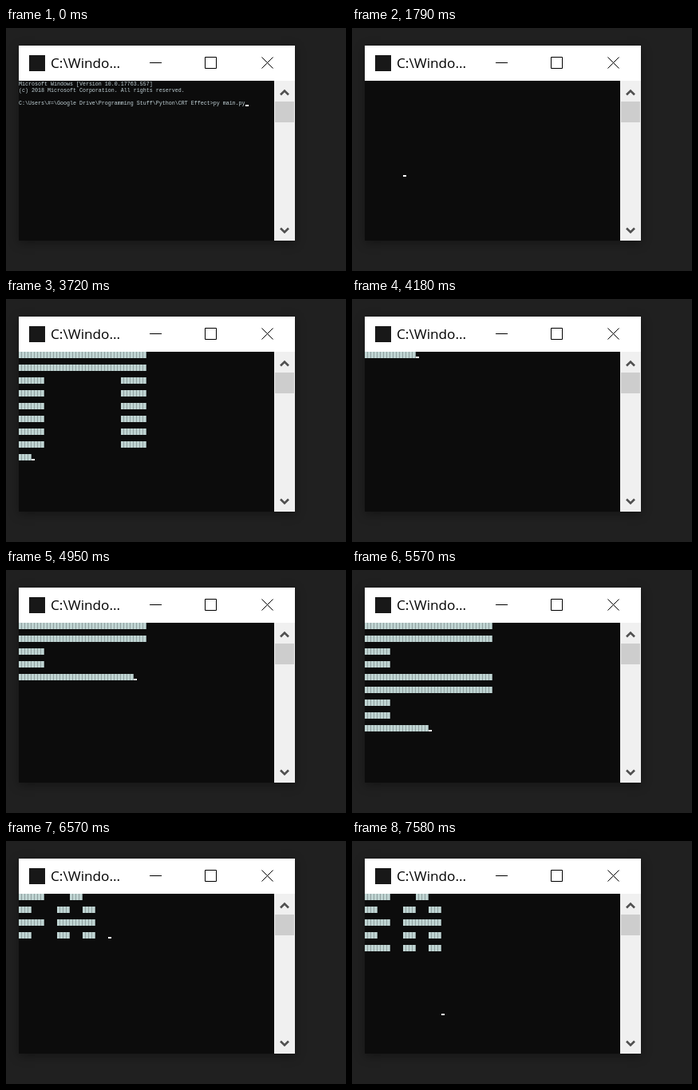
An HTML page with a canvas for the animation above (7.66 s loop, 426 by 304 pixels).

```html
<!DOCTYPE html>
<html lang="en">
<head>
<meta charset="utf-8">
<title>Console</title>
<style>
  html, body { margin: 0; width: 100%; height: 100%; overflow: hidden; background: #202020; }
  #stage { position: relative; width: 426px; height: 304px; overflow: hidden; background: #202020; }
  #window {
    position: absolute; left: 16px; top: 22px; width: 346px; height: 244px;
    background: #fff; box-shadow: 0 3px 12px rgba(0, 0, 0, .38);
  }
  #title {
    position: absolute; left: 40px; top: 10px; line-height: 24px; color: #000;
    font-family: "Open Sans", "Noto Sans", sans-serif; font-size: 17.2px; white-space: pre;
  }
  #icon { position: absolute; left: 13px; top: 12px; width: 20px; height: 20px; background: #181818; }
  #chrome { position: absolute; left: 0; top: 0; }
  #console { position: absolute; left: 0; top: 44px; width: 320px; height: 200px; background: #0c0c0c; }
  #console canvas { position: absolute; left: 0; top: 0; }
  #prompt {
    position: absolute; left: 0; top: 0; margin: 0; color: #c3d3d8; white-space: pre;
    font: 6.667px/8px "Liberation Mono", "DejaVu Sans Mono", monospace;
  }
</style>
</head>
<body>
<div id="stage">
  <div id="window">
    <div id="icon"></div>
    <div id="title">C:\Windo...</div>
    <div id="console">
      <pre id="prompt">Microsoft Windows [Version 10.0.17763.557]
(c) 2018 Microsoft Corporation. All rights reserved.

C:\Users\#=\Google Drive\Programming Stuff\Python\CRT Effect&gt;py main.py</pre>
      <canvas id="screen" width="320" height="200"></canvas>
    </div>
    <svg id="chrome" width="346" height="244" fill="none">
      <path d="M164 21.5h15M233.5 14.5h14v14h-14z" stroke="#000"/>
      <path d="M304.5 14.5l14 14M318.5 14.5l-14 14" stroke="#000"/>
      <path d="M320 44h26v200h-26z" fill="#f0f0f0"/>
      <path d="M321 70h24v26h-24z" fill="#cdcdcd"/>
      <path d="M328 61.5l5-5 5 5M328 228.500l5 5 5-5" stroke="#505050" stroke-width="2.6"/>
    </svg>
  </div>
</div>
<script>
const LOOP = 7660, SIZE = 10, ROW_STEPS = SIZE + 1, LAST_STEP = SIZE * ROW_STEPS;
const CELL_W = 4, CELL_H = 8, DOT = 16;
const ENTER_AT = 320;

// Screen refresh times: first and last of each run of ten, then a final pair
const runs = [
  [550, 1250], [1330, 2020], [2100, 2800], [2870, 3570], [3640, 4340],
  [4410, 5100], [5180, 5870], [5950, 6640], [6720, 7430]
];
const ticks = runs.flatMap(([a, b]) =>
  Array.from({ length: 10 }, (_, k) => Math.round((a + (b - a) * k / 9) / 10) * 10)
).concat(7510, 7580);

const full = "##########", sides = "##      ##", left = "##";
const ring = [full, full, sides, sides, sides, sides, sides, sides, full, full];
const bars = [full, full, left, left, full, full, left, left, full, full];
const letters = ["##  #", "#  # #", "## ###", "#  # #", "## # #"];

// from: first refresh; at a known refresh the beam is at a known step
const images = [
  { rows: [], from: 0, ref: 16, step: 80.65, rate: 4.9 },
  { rows: ring, from: 23, ref: 27, step: 20.9, rate: 4.88 },
  { rows: bars, from: 46, ref: 57, step: 53.95, rate: 4.95 },
  { rows: letters, from: 70, ref: 89, step: 95.2, rate: 4.95 }
];

const ctx = document.getElementById("screen").getContext("2d");
const prompt = document.getElementById("prompt");

function drawCursor(x, line) {
  ctx.fillStyle = "#fff";
  ctx.fillRect(x, line * CELL_H + 6, CELL_W, 2);
}

function drawDot(col, row) {
  const x = col * DOT, y = row * DOT;
  ctx.fillStyle = "#bfd4d2";
  ctx.fillRect(x, y, DOT, CELL_H);
  ctx.fillStyle = "#8f9f9f";
  for (let i = 1; i <= 4; i++) ctx.fillRect(x + i * CELL_W - 1, y, 1, CELL_H);
}

function drawScan(n) {
  const { rows, ref, step, rate } = images.filter(im => im.from <= n).pop();
  const raw = Math.max(0, Math.floor(step + (n - ref) * rate));
  const s = Math.min(raw, LAST_STEP);
  const wiped = raw >= LAST_STEP + 3;
  if (!wiped) {
    rows.forEach((line, r) => {
      for (let c = 0; c < line.length; c++) {
        if (line[c] === "#" && r * ROW_STEPS + c < s) drawDot(c, r);
      }
    });
  }
  drawCursor(s % ROW_STEPS * DOT, Math.floor(s / ROW_STEPS) * 2);
}

function render(t) {
  ctx.clearRect(0, 0, 320, 200);
  const n = ticks.filter(at => at <= t).length - 1;
  prompt.style.visibility = n < 0 ? "visible" : "hidden";
  if (n >= 0) drawScan(n);
  else if (t < ENTER_AT) drawCursor(71 * CELL_W, 3);
  else drawCursor(0, 4);
}

const start = performance.now();
function frame() {
  render((performance.now() - start) % LOOP);
  requestAnimationFrame(frame);
}
frame();
</script>
</body>
</html>
```
